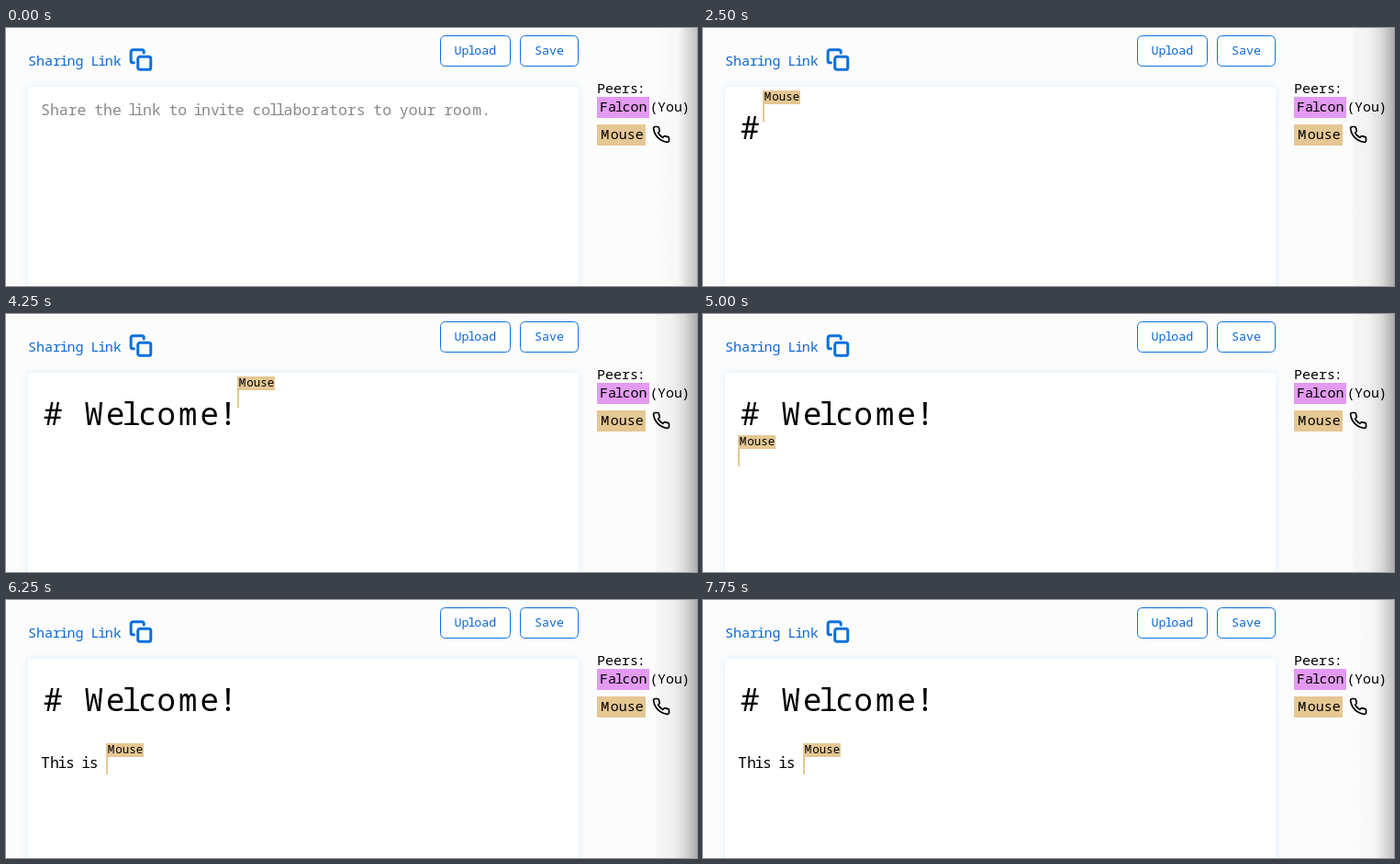
Write an HTML page that moves like this. It is 753 px wide and 281 px high and loops after 8000 ms.

```html
<!DOCTYPE html>
<html lang="en">
<head>
<meta charset="utf-8">
<title>Shared editor</title>
<style>
html, body { margin: 0; width: 100%; height: 100%; overflow: hidden; background: #fcfcfc; }
svg { display: block; }
text { font-family: "Noto Sans Mono", "DejaVu Sans Mono", monospace; text-anchor: middle; }
.line { fill: none; stroke-linecap: round; stroke-linejoin: round; }
.blue { stroke: #0b70dc; }
.card { filter: drop-shadow(0 0 4px #dcebfa); }
</style>
</head>
<body>
<svg id="stage" width="753" height="281" viewBox="0 0 753 281">
  <defs>
    <linearGradient id="soft">
      <stop offset="0" stop-color="#fcfcfc"/>
      <stop offset=".55" stop-color="#f6f6f6"/>
      <stop offset="1" stop-color="#c2c2c2"/>
    </linearGradient>
    <linearGradient id="hard">
      <stop offset="0" stop-color="#f6f6f6"/>
      <stop offset=".4" stop-color="#f1f1f1"/>
      <stop offset=".7" stop-color="#dadada"/>
      <stop offset="1" stop-color="#adadad"/>
    </linearGradient>
  </defs>
  <rect width="753" height="281" fill="#fcfcfc"/>
  <rect id="edge" x="708" width="45" height="281"/>
  <rect class="card" x="24" y="64" width="600" height="240" rx="4" fill="#fff"/>
  <g class="line blue" stroke-width="2.8" transform="translate(134 21.6) scale(1.08)">
    <rect x="9" y="9" width="13" height="13" rx="2"/>
    <path d="M5 15H4a2 2 0 0 1-2-2V4a2 2 0 0 1 2-2h9a2 2 0 0 1 2 2v1"/>
  </g>
  <g class="blue" fill="#fff">
    <rect x="473.5" y="8.5" width="76" height="33" rx="5"/>
    <rect x="560.5" y="8.5" width="63" height="33" rx="5"/>
  </g>
  <rect x="644" y="75" width="57" height="23" fill="#e39af2"/>
  <rect x="644" y="105" width="53" height="23" fill="#e5c793"/>
  <path class="line" stroke="#000" stroke-width="2" transform="translate(703.8 105.8) scale(.85)"
    d="M22 16.92v3a2 2 0 0 1-2.18 2 19.79 19.79 0 0 1-8.63-3.07 19.5 19.5 0 0 1-6-6 19.79 19.79 0 0 1-3.07-8.67A2 2 0 0 1 4.11 2h3a2 2 0 0 1 2 1.72 12.84 12.84 0 0 0 .7 2.81 2 2 0 0 1-.45 2.11L8.09 9.91a16 16 0 0 0 6 6l1.27-1.27a2 2 0 0 1 2.11-.45 12.84 12.84 0 0 0 2.81.7A2 2 0 0 1 22 16.92z"/>
  <g id="caret">
    <rect width="41" height="15" fill="#e5c793"/>
    <rect width="2" height="34" fill="#e5c793"/>
  </g>
</svg>
<script>
const $ = id => document.getElementById(id);
const stage = $("stage"), edge = $("edge"), caret = $("caret");

// Semi-monospaced setting: a few classes of character get narrower or wider cells.
const cell = c => /[il.:]/.test(c) ? .72 : /[mwMW#]/.test(c) ? 1.3 : /[ ()]/.test(c) ? .88 : 1;
const measure = (s, size) => [...s].reduce((w, c) => w + cell(c), 0) * size * .6;

function write(s, x, y, size, fill = "#000", parent = stage, weight = 400) {
  const el = document.createElementNS("http://www.w3.org/2000/svg", "text");
  const centers = [...s].map((c, i) =>
    (x + measure(s.slice(0, i), size) + cell(c) * size * .3).toFixed(2));
  const attrs = { x: centers.join(" "), y, fill, "font-size": size, "font-weight": weight };
  for (const k in attrs) el.setAttribute(k, attrs[k]);
  el.textContent = s;
  return parent.appendChild(el);
}

const BLUE = "#0b68d4", LEFT = 38, H1 = 34, BODY = 16.5;
const title = "# Welcome!", body = "This is conc";

write("Sharing Link", 24, 41, 15, BLUE);
write("Upload", 488.5, 29, 13.33, BLUE);
write("Save", 576, 29, 13.33, BLUE);
write("Peers:", 644, 71, 15);
write("Falcon", 647, 91, 15);
write("(You)", 702, 91, 15);
write("Mouse", 647, 121, 15);
write("Mouse", .6, 11, 12.5, "#000", caret);

const hint = write("Share the link to invite collaborators to your room.", LEFT, 95, BODY, "#888");
const titleEl = write(title, LEFT, 121, H1, "#000", stage, 500);
const bodyEl = write(body, LEFT, 183, BODY);
stage.append(caret);

// [start ms, caret top, characters typed on that line]
const steps = [
  [2500, 68, 1], [2750, 68, 2], [3000, 68, 3], [3250, 68, 4], [3500, 68, 6],
  [3750, 68, 9], [4250, 68, 10], [5000, 132, 0], [5250, 156, 0], [5500, 156, 1],
  [5750, 156, 4], [6000, 156, 6], [6250, 156, 8], [6500, 156, 10], [6750, 156, 11],
  [7000, 156, 12], [7500, 156, 10], [7750, 156, 8]
];

const show = (el, on) => el.setAttribute("visibility", on ? "visible" : "hidden");

function draw(now) {
  const t = now % 8000;
  const [, top, n] = steps.findLast(s => s[0] <= t) || [0, 0, 0];
  const onTitle = top === 68;
  titleEl.textContent = top ? title.slice(0, onTitle ? n : title.length) : "";
  bodyEl.textContent = top === 156 ? body.slice(0, n) : "";
  show(hint, !top);
  show(caret, top);
  const x = LEFT + (onTitle ? measure(title.slice(0, n), H1) : measure(body.slice(0, n), BODY));
  caret.setAttribute("transform", `translate(${Math.round(x)} ${top})`);
  edge.setAttribute("fill", t >= 500 && t < 7500 ? "url(#hard)" : "url(#soft)");
  requestAnimationFrame(draw);
}
draw(performance.now());
</script>
</body>
</html>
```
